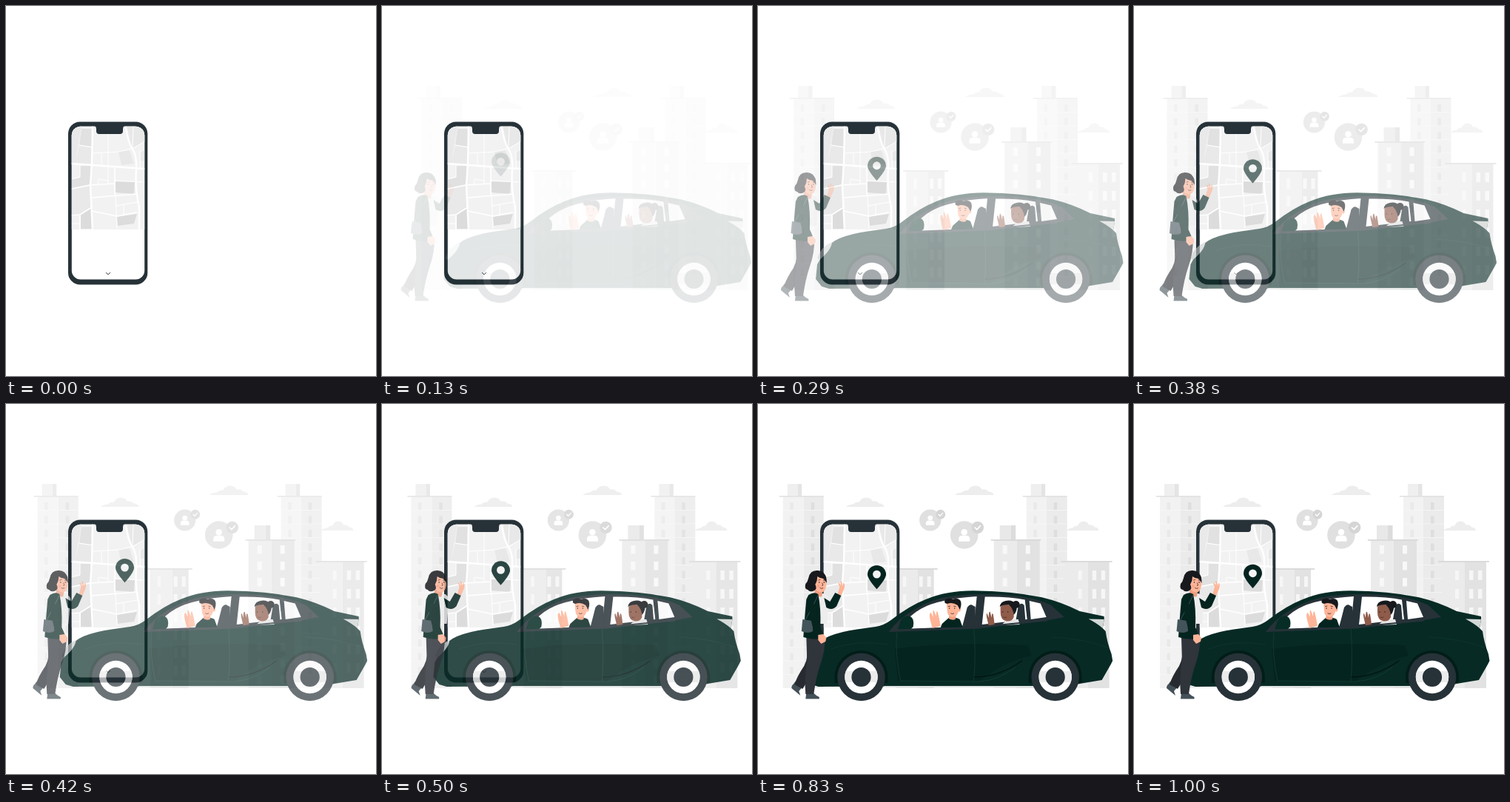
An HTML page with a canvas for the animation above (1.04 s loop, 500 px wide and 500 px high).

```html
<!DOCTYPE html>
<html lang="en">
<head>
<meta charset="utf-8">
<title>Ride sharing</title>
<style>
html, body { margin: 0; width: 100%; height: 100%; overflow: hidden; background: #fff; }
canvas { display: block; width: 500px; height: 500px; }
</style>
</head>
<body>
<canvas id="stage" width="500" height="500"></canvas>
<script>
const LOOP = 1040, FPS = 24, TRAVEL = 20;
const DARK = '#263238', GREEN = '#04241f', PAINT = '#072a25';
const SKIN = '#ffb497', BROWN = '#8f5b4a', INK = '#17191c';
const out = document.getElementById('stage').getContext('2d');
const buffer = document.createElement('canvas');
buffer.width = buffer.height = 500;
const layer = buffer.getContext('2d');
let g = out;

function fill(d, color) {
  g.fillStyle = color;
  g.fill(new Path2D(d));
}
function line(d, color, width = 1) {
  g.strokeStyle = color;
  g.lineWidth = width;
  g.lineCap = g.lineJoin = 'round';
  g.stroke(new Path2D(d));
}
function box(x, y, w, h, color) {
  g.fillStyle = color;
  g.fillRect(x, y, w, h);
}
function round(x, y, w, h, r, color) {
  g.fillStyle = color;
  g.beginPath();
  g.roundRect(x, y, w, h, r);
  g.fill();
}
function disc(x, y, r, color, ry = r) {
  g.fillStyle = color;
  g.beginPath();
  g.ellipse(x, y, r, ry, 0, 0, 7);
  g.fill();
}

// Progress with a soft overshoot: cubic-bezier(.36, -.01, .5, 1.38)
function ease(t) {
  if (t <= 0) return 0;
  if (t >= 1) return 1;
  const curve = (s, a, b) => 3 * (1 - s) ** 2 * s * a + 3 * (1 - s) * s * s * b + s ** 3;
  let lo = 0, hi = 1;
  for (let i = 0; i < 24; i++) {
    const mid = (lo + hi) / 2;
    if (curve(mid, .36, .5) < t) lo = mid; else hi = mid;
  }
  return curve(lo, -.01, 1.38);
}

function rows(xs, w, h, y0, gap, color) {
  for (let y = y0; y < 372; y += gap) for (const x of xs) box(x, y, w, h, color);
}

function tower(x, capX, mid, right) {
  box(capX, 108, 14, 16, '#efefef');
  box(capX + 14, 108, 5.5, 16, '#e4e4e4');
  box(x, 125, mid - x, 259, '#f2f2f2');
  box(mid, 125, right - mid, 259, '#ebebeb');
  box(x - 5, 124, right - x + 5, 1.6, '#e2e2e2');
  for (let y = 143; y < 380; y += 18.5) box(x, y, right - x, .7, '#f8f8f8');
  rows([x + 9.5], 4.5, 10, 133, 18.5, '#e9e9e9');
  rows([mid + 10], 4.5, 10, 133, 18.5, '#dedede');
}

function block(x, mid, right, top, slabL, slabR) {
  box(x, top, mid - x, 384 - top, '#ebebeb');
  box(mid, top, right - mid, 384 - top, '#e2e2e2');
  box(slabL, top - 1, slabR - slabL, 1.8, '#d9d9d9');
}

function cloud(x, y, w) {
  g.save();
  g.translate(x, y);
  g.scale(w / 52, 1);
  fill('M0 13Q4 9.5 10 9.5Q13 6 18 6.5Q21 .5 27 .5Q34 .5 36 5.5Q42 4.5 45 8.5Q51 8.5 52 13Z', '#ededed');
  g.restore();
}

function badge(x, y, r) {
  const k = r / 15, bx = x + 15 * k * .96, by = y - 8 * k;
  disc(x, y, r, '#e0e0e0');
  disc(x, y - 3 * k, 3.4 * k, '#fff');
  fill(`M${x - 6 * k} ${y + 7 * k}v${-2.5 * k}q0 ${-4 * k} ${4 * k} ${-4 * k}h${4 * k}q${4 * k} 0 ${4 * k} ${4 * k}v${2.5 * k}Z`, '#fff');
  disc(bx, by, 6.6 * k, '#d5d5d5');
  line(`M${bx - 2.8 * k} ${by}l${2.1 * k} ${2.1 * k}l${3.7 * k} ${-4 * k}`, '#fff', 1.3 * k);
}

function city() {
  tower(35, 41, 63, 90);
  tower(364, 370, 391, 419);

  block(187, 217, 239, 223, 183, 244);
  rows([197], 4.5, 14, 233, 24, '#f6f6f6');
  rows([219, 230], 5, 14, 233, 24, '#f6f6f6');

  box(328, 164, 15, 19, '#e8e8e8');
  box(343, 164, 6.5, 19, '#dcdcdc');
  block(320, 351, 382, 184, 316, 383.5);
  rows([332, 363], 6, 11.5, 191, 22, '#f8f8f8');

  block(416, 447, 476, 213, 411, 480);
  rows([434], 5, 13, 225, 25, '#f6f6f6');
  rows([453, 465], 5.5, 13, 225, 25, '#f6f6f6');

  cloud(120, 126, 52);
  cloud(267, 110, 53);
  cloud(418, 158, 44);
  badge(234, 157, 14.6);
  badge(280, 177, 18.8);
}

function phone() {
  round(84, 156.5, 107.3, 220, 16, DARK);
  round(88.8, 162.8, 98.4, 206.7, 12, '#fff');
  g.save();
  g.beginPath();
  g.roundRect(88.8, 162.8, 98.4, 139.2, [12, 12, 0, 0]);
  g.clip();
  box(88, 162, 100, 140, '#f2f2f2');
  fill('M88 162H102L93 214H88ZM99 189L116 191V214L93 213ZM89 247L114 242V277L100 283L89 284Z', '#e9e9e9');
  fill('M102 166H117L116 190L99 188ZM100 216H114V241L89 246V234L100 232Z', '#e1e1e1');
  fill('M152 197L167 195L173 213L156 215ZM163 162H188V183L170 192ZM181 198L187 195V209H181Z', '#e8e8e8');
  fill('M147 237L174 238L173 254L148 252ZM150 285L177 281L173 294L151 297ZM101 282L115 273L116 301H101Z', '#dcdcdc');
  line('M89 213L187 220M117 163L116 214L114 242L117 302M162 163Q164 184 173 197Q177 207 176 222Q174 245 180 272V302', '#fff', 2.4);
  line('M89 247L114 242L147 240M147 219V252L148 256M116 259L176 254M116 277L150 284L176 279M100 283V302M89 283L100 282L116 272', '#fff', 1.7);
  line('M138 166V240M117 199L152 197L173 192L187 183M99 188L117 191M147 236L187 238M148 270L178 265M148 256L150 300M181 196V220M125 241V234L138 236M89 234L100 231V215M89 294H99M129 199V215M172 163L171 192M159 269V282', '#fff', 1);
  g.restore();
  fill('M120 162H160Q158 163 158 166V169Q158 173 154 173H126Q122 173 122 169V166Q122 163 120 162Z', DARK);
  line('M135.3 360.4L138 362.9L140.7 360.4', DARK, .9);
}

function pin() {
  fill('M160.5 249Q148 235 148 229A12.5 12.3 0 0 1 173 229Q173 235 160.5 249Z', GREEN);
  disc(160.5, 228.8, 5.4, '#f4f4f4');
}

function wheel(x) {
  const y = 369;
  fill(`M${x - 36} 377V${y}A36 36 0 0 1 ${x + 36} ${y}V377Z`, '#021d18');
  disc(x, y, 32.3, DARK);
  disc(x, y, 22.2, '#fff');
  fill(`M${x - 20.8} ${y - 8}A22.2 22.2 0 0 0 ${x - 21} ${y + 7}H${x + 21}A22.2 22.2 0 0 0 ${x + 20.8} ${y - 8}Z`, '#ebebeb');
  disc(x, y, 13.1, DARK);
}

function driver() {
  fill('M277 302Q281 287 284 275Q288 269 292 272.5L295 274V302Z', DARK);
  fill('M248 302L250 297L259 289Q270 288 274 291L278 302Z', GREEN);
  fill('M237 303L248 300L246 289L244 281Q242 278 242 287L239 279Q237 277 238 288L235 282Q232 282 234 292Z', SKIN);
  fill('M260 284H269L268 291Q264 293 259 290Z', '#f29f80');
  fill('M256 268Q264 263 272 269L272 281Q270 288 264 288Q257 287 257 279Z', SKIN);
  disc(273.2, 278, 2, SKIN, 2.8);
  fill('M254 269Q252 264 257 263Q261 261 264 264Q272 261 275 266Q277 271 274 278L271 272Q264 267 257 270Z', INK);
  disc(260, 276, .7, INK);
  disc(267, 276, .7, INK);
  line('M258.5 273.6l2.4-.5M266 273.2l2.4.5M262 283q2 1.4 4 0', INK, .7);
}

function passenger() {
  fill('M349 297L353 273Q357 267 361 272L363 296Z', DARK);
  fill('M330 299Q336 292 344 291L353 291L355 298Z', '#e6e6e6');
  fill('M313 300L321 298L320 290L319 284Q317 281 317 289L315 281Q313 279 313 289L311 283Q309 283 311 291Z', BROWN);
  disc(350, 271, 5, INK);
  fill('M329 274Q336 268 344 273L347 281V288Q345 294 337 293.5Q329 292 329 282Z', BROWN);
  fill('M328 274Q329 267 336 266Q345 264 350 271Q353 278 347 285Q346 276 340 271Q333 271 328 274Z', INK);
  disc(332, 281, .7, INK);
  disc(339, 281, .7, INK);
  line('M333 288q2 1.6 4 .2', '#4c2b22', .8);
}

function car() {
  box(172, 376, 200, 7, '#dfe3e2');
  fill('M83 382L73 379L65 369L67 349L77 331Q83 320 97 314Q113 307.5 135 304.5L160 301Q172 299 181 292Q206 272.5 228 264Q256 252.2 292 252.2Q344 252.5 385 261.3Q411 267.5 436 280L469 287V291L467 303L471 307Q473 322 479 338L480.5 347L478 352L466 373L436 378L425 381H172V381.5Z', PAINT);
  fill('M186 331Q260 321 366 326L371 340Q330 350 300 375L190 374Z', '#04241f');
  fill('M448 290.5L469 291L467 303Q459 296 448 290.5Z', '#d3d8d7');
  fill('M87 319Q86 330 70 343L67 341Q72 325 87 319Z', '#c7cccc');
  fill('M178 308Q190 291 212 278Q236 263 268 259Q312 255 352 259.5Q378 262.5 397 271.5L415 288L391 292.5L300 303.5Z', DARK);
  fill('M193 303Q206 285 222 276.5Q245 263.5 297 260L293 300L212 303.5Z', '#fff');
  fill('M308 260.5Q340 260 362 264.5L365 291L304 298Z', '#fff');
  fill('M368 266L383 269.5L391 288L370 291Z', '#fff');
  line('M364 264L367 291', DARK, 3);
  fill('M178 308Q188 298 194 293L197 304Z', DARK);
  driver();
  passenger();
  fill('M190 305L194 293Q199 285 207 287Q213 290 211 301L207 305Z', '#062d26');
  line('M190 305.5L293 302L391 292.5', DARK, 2);
  line('M189 309Q186 337 194 374L300 375Q325 374 349 356M293 304Q296 340 293 374', '#184139', .7);
  line('M294 369Q327 369 358 347', '#001410', 1.3);
  line('M100 331Q134 318 177 325M398 315Q442 317 473 329', '#10372f', .8);
  wheel(140.8);
  wheel(403);
}

function woman() {
  fill('M49 375L60 381L54 388L56 394L44 384Q44 380 47 378Z', '#435057');
  fill('M64 390H73Q77 394 81.5 396V398.5H63Z', '#435057');
  fill('M48 379L59 385Q71 366 78 350L86 318H65Q68 341 61 354Q52 367 48 379Z', '#272b31');
  fill('M64 315L89 315Q90 333 83 352Q77 370 74 392H63Q61 369 65 347Z', '#30343b');
  fill('M80 256Q91 254 95 263L92 297H81Z', '#ededed');
  fill('M76 246L86 253L85 260Q80 262 75 256Z', '#ed9e80');
  // Raised arm
  fill('M106 258L109 247L107 242Q108 240 111 246L110 240Q112 238 113 246L114 242Q117 242 115 250L111 259Z', SKIN);
  fill('M88 262L96 267L103 255L111 259L105 273Q99 280 91 275Z', GREEN);
  // Jacket and bag
  fill('M67 258Q75 253 80 257Q84 276 83 302L89 316Q74 320 60 315Q62 285 64 264Z', GREEN);
  line('M80 258Q72 276 62 293', '#40545a', .9);
  fill('M59 291L72 293L73 307Q66 311 57.5 307Z', '#44545b');
  fill('M67 270Q72 266 76 273L80 296L88 314L79 316Q70 301 67 270Z', '#06251f');
  fill('M80 312L87 311L91 316L90 321L84 324L80 319Z', SKIN);
  // Head
  fill('M74 232Q83 227 91 234L91 245Q90 255 83 254.5Q75 253 74 244Z', SKIN);
  fill('M67 235Q69 225 78 225Q88 224 91 235Q84 237 79 233Q79 239 76 244Q79 249 75 252Q69 255 66 251Q61 250 63 243Q66 240 67 235Z', INK);
  fill('M84 228Q92 230 91.5 242Q88 236 83 233Z', INK);
  disc(81.5, 241, .8, INK);
  disc(88, 241, .8, INK);
  line('M80.5 238l2.2-.5M87 238l2 .3M85.5 242l1 3l-1.2.5M82.5 248.5q2 1.8 4 .3', INK, .7);
  disc(80, 246, 1.8, 'rgba(240,125,105,.35)');
}

function show(draw, dx, dy, alpha) {
  layer.setTransform(1, 0, 0, 1, 0, 0);
  layer.clearRect(0, 0, 500, 500);
  layer.translate(dx, dy);
  g = layer;
  draw();
  g = out;
  out.globalAlpha = alpha;
  out.drawImage(buffer, 0, 0);
  out.globalAlpha = 1;
}

function render(ms) {
  // Steps start at multiples of 1/24 s, rounded to 10 ms
  const t = Math.floor((ms + 5) * FPS / 1000) / FPS;
  const shift = TRAVEL * (1 - ease(t + .02));
  const alpha = t < .125 ? 0 : Math.min(1, ease(t + .05));
  out.fillStyle = '#fff';
  out.fillRect(0, 0, 500, 500);
  if (alpha) show(city, shift, 0, alpha);
  phone();
  if (!alpha) return;
  show(pin, 0, -shift, alpha);
  show(car, shift, 0, alpha);
  show(woman, -shift, 0, alpha);
}

const start = performance.now();
function tick() {
  render((performance.now() - start) % LOOP);
  requestAnimationFrame(tick);
}
tick();
</script>
</body>
</html>
```
